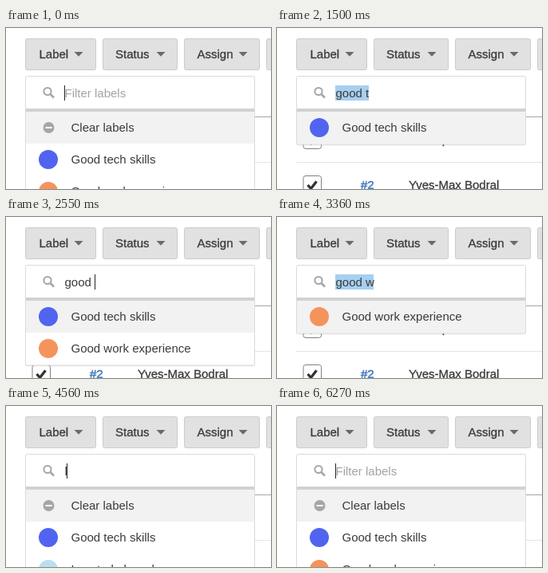
These frames come from a looping animation (332 px wide and 202 px high, 6.6 s). An HTML page:

```html
<!DOCTYPE html>
<html lang="en">
<head>
<meta charset="utf-8">
<title>Label filter</title>
<style>
html, body { margin: 0; width: 100%; height: 100%; overflow: hidden; background: #fff; }
svg { display: block; font: 15px "Liberation Sans", Arial, sans-serif; fill: #3a3a3a; }
.strong { stroke: #3a3a3a; stroke-width: .3px; }
.id { fill: #4a7dbd; stroke: #4a7dbd; stroke-width: .6px; }
</style>
</head>
<body>
<svg width="332" height="202" viewBox="0 0 332 202">
  <g id="page"></g>
  <g id="popup"></g>
  <g id="field">
    <rect id="mark" x="73" y="72" height="19" fill="#a7cff0"/>
    <text id="typed" x="73.5" y="87"></text>
    <rect id="caret" y="72" width="1" height="19" fill="#222"/>
  </g>
</svg>
<script>
const LOOP = 6600;
const $ = id => document.getElementById(id);
const rect = (x, y, w, h, fill, more = '') =>
  `<rect x="${x}" y="${y}" width="${w}" height="${h}" fill="${fill}" ${more}/>`;
const text = (x, y, s, style = '') => `<text x="${x}" y="${y}" class="${style}">${s}</text>`;

const CLEAR = ['Clear labels'];
const TECH = ['Good tech skills', '#5064f0'];
const WORK = ['Good work experience', '#f5935c'];
const ABROAD = ['Located abroad', '#b9dff0'];
const ALL = [CLEAR, TECH, WORK, ABROAD], GOOD = [TECH, WORK];

// time, field text, listed labels, caret mode
const steps = [
  [0, '', ALL, 'on'],
  [120, 'g', GOOD, 'on'],
  [240, 'go', GOOD, 'on'],
  [330, 'goo', GOOD, 'on'],
  [420, 'good', GOOD, 'on'],
  [630, 'good ', GOOD, 'on'],
  [840, 'good t', GOOD, 'on'],
  [900, 'good t', [TECH], 'on'],
  [1320, 'good t', [TECH], 'off'],
  [1470, 'good t', [TECH], 'select'],
  [1680, '', ALL, 'on'],
  [2040, 'g', GOOD, 'on'],
  [2130, 'go', GOOD, 'on'],
  [2220, 'goo', GOOD, 'on'],
  [2280, 'good', GOOD, 'on'],
  [2550, 'good ', GOOD, 'on'],
  [2910, 'good w', GOOD, 'on'],
  [3000, 'good w', [WORK], 'on'],
  [3360, 'good w', [WORK], 'select'],
  [3750, '', ALL, 'on'],
  [4230, '', ALL, 'off'],
  [4500, 'l', ALL, 'on'],
  [4560, 'l', [CLEAR, TECH, ABROAD], 'on'],
  [4710, 'lo', [CLEAR, TECH, ABROAD], 'on'],
  [4770, 'lo', [ABROAD], 'on'],
  [4860, 'loc', [ABROAD], 'on'],
  [5250, 'loc', [ABROAD], 'off'],
  [5340, 'loca', [ABROAD], 'on'],
  [5790, 'loca', [ABROAD], 'off'],
  [6000, 'loca', [ABROAD], 'select'],
  [6270, '', ALL, 'on']
];

const button = (x, w, label, tx, ax) =>
  rect(x + .5, 13.5, w - 1, 39, '#e1e1e1', 'rx="2" stroke="#cbcbcb"') +
  text(tx, 38, label, 'strong') + `<path d="M${ax} 30h11l-5.5 5.8z" fill="#6a6a6a"/>`;

const tableRow = (y, id, name) =>
  rect(33, y + 17.5, 22.5, 23, '#fff', 'rx="3" stroke="#808080"') +
  `<path d="M38.5 ${y + 29}l4 4.5 7-9" fill="none" stroke="#333" stroke-width="3.3"/>` +
  text(105, y + 34, id, 'id') + text(165, y + 34, name, 'strong');

function item([label, color], i) {
  const y = 125 + i * 40;
  const icon = color ? `<circle cx="53" cy="${y}" r="12" fill="${color}"/>`
    : `<circle cx="53.5" cy="${y}" r="7" fill="#a6a6a6"/>` + rect(49.5, y - 1, 8, 2, '#fff');
  return (i ? '' : rect(25, 105, 286, 40, '#f2f2f2')) + icon + text(81.5, y + 5, label);
}

function popup(list) {
  const h = 45.5 + list.length * 40;
  return rect(24, 62, 288, h, '#000', 'rx="2" opacity=".08"') +
    rect(24.5, 60.5, 287, h, '#fff', 'rx="2" stroke="#dadada"') +
    rect(25, 101, 286, 4, '#d0d2d0') +
    '<path d="M55.5 83l4.5 4.5" stroke="#a6a6a6" stroke-width="2.5"/>' +
    '<circle cx="52" cy="79.5" r="4.6" fill="none" stroke="#a6a6a6" stroke-width="2"/>' +
    list.map(item).join('');
}

$('page').innerHTML =
  button(24, 89, 'Label', 41.5, 85.5) + button(121, 94, 'Status', 137, 188.5) +
  button(223, 95, 'Assign', 239.5, 291.5) + button(326, 95, '', 342, 394) +
  rect(24, 111, 308, 1, '#a4a4a4') + rect(24, 168, 308, 1, '#e4e4e4') +
  tableRow(111, '#1', 'Milo Spelnar') + tableRow(168, '#2', 'Yves-Max Bodral');

const typed = $('typed');
let shown;

function show([, value, list, mode]) {
  $('popup').innerHTML = popup(list);
  typed.textContent = value.replace(' ', '\u00a0') || 'Filter labels';
  typed.setAttribute('fill', value ? '#3a3a3a' : '#a3a3a3');
  const width = value ? Math.round(typed.getComputedTextLength()) : 0;
  $('mark').setAttribute('width', mode === 'select' ? width : 0);
  $('caret').setAttribute('x', 73 + width);
  $('caret').setAttribute('visibility', mode === 'on' ? 'visible' : 'hidden');
}

const start = performance.now();
function draw() {
  const t = (performance.now() - start) % LOOP;
  const step = steps.findLast(s => s[0] <= t);
  if (step !== shown) show(shown = step);
  requestAnimationFrame(draw);
}
draw();
</script>
</body>
</html>
```
